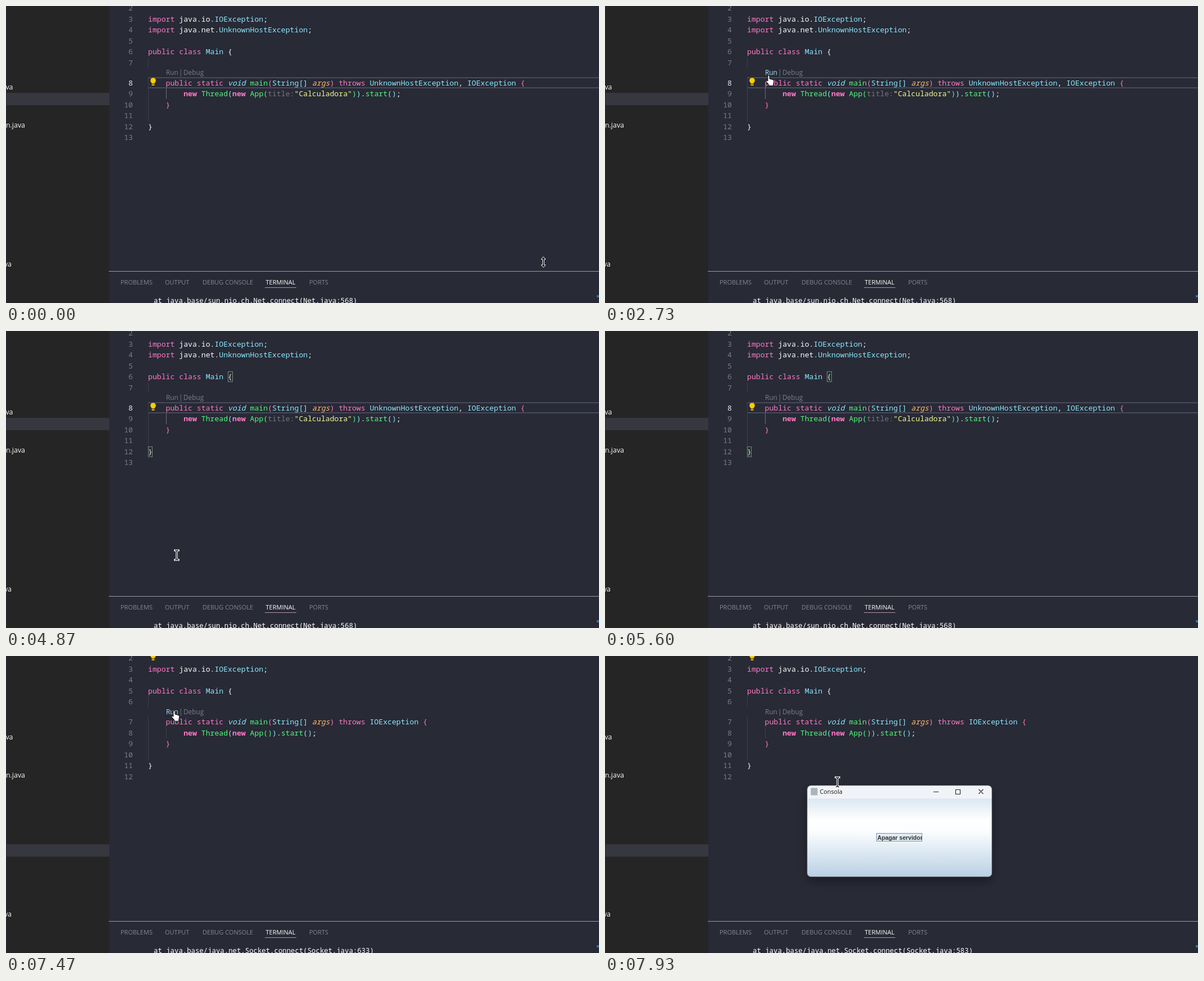
An HTML page that plays this animation: 1056x530 px, repeating every 8 s.

```html
<!DOCTYPE html>
<html lang="en">
<head>
<meta charset="utf-8">
<title>Code editor</title>
<style>
html, body { margin: 0; width: 100%; height: 100%; overflow: hidden; background: #282a36; }
svg { display: block; width: 1056px; height: 530px; }
text { white-space: pre; }
.code { font: 500 13.16px "Noto Sans Mono", "DejaVu Sans Mono", monospace; font-variant-ligatures: none; }
.term { font: 500 12.34px "Noto Sans Mono", "DejaVu Sans Mono", monospace; fill: #fff; }
.ui { font-family: "Open Sans", "Noto Sans", sans-serif; }
.num { fill: #7a7b87; text-anchor: end; font-weight: 400; }
.lens { font-size: 11.8px; fill: #7d7e8c; }
.lens.hover { fill: #a8e8f6; }
.w { fill: #fbfbf7; } .p { fill: #ff79c6; } .c { fill: #8be9fd; } .g { fill: #50fa7b; }
.y { fill: #f1fa8c; } .h { fill: #747581; font-weight: 400; }
.b { fill: #ff79c6; font-weight: bold; }
.i { fill: #8be9fd; font-style: italic; }
.a { fill: #ffb86c; font-style: italic; }
.guide { stroke: #3d3f4b; }
.box { fill: #0064001a; stroke: #7f8286; }
</style>
</head>
<body>
<svg viewBox="0 0 1056 530">
  <defs>
    <linearGradient id="metal" x2="0" y2="1">
      <stop offset="0" stop-color="#dbe7f1"/>
      <stop offset=".28" stop-color="#fff"/>
      <stop offset=".42" stop-color="#fbfdfe"/>
      <stop offset="1" stop-color="#b9d0e4"/>
    </linearGradient>
    <filter id="shadow" x="-20%" y="-20%" width="140%" height="150%">
      <feDropShadow dx="0" dy="7" stdDeviation="9" flood-color="#000" flood-opacity=".4"/>
    </filter>
    <clipPath id="label"><rect x="484" y="316" width="80.5" height="16"/></clipPath>
    <path id="beamLine" d="M-3-8.5Q0-8.5 0-6.5Q0-8.5 3-8.5M0-6.5V6.5M-3 8.5Q0 8.5 0 6.5Q0 8.5 3 8.5"/>
  </defs>

  <rect width="1056" height="530" fill="#282a36"/>
  <rect width="184" height="530" fill="#252525"/>
  <rect width="1" height="530" fill="#2b2c36"/>
  <rect id="selected" x="1" width="183" height="22" fill="#37373f"/>
  <g class="ui w" font-size="12.4" text-anchor="end">
    <text x="12.5" y="149">.java</text>
    <text x="34" y="217">n.java</text>
    <text x="10" y="465">.java</text>
  </g>

  <g id="first"></g>
  <g id="second"></g>

  <rect x="183" y="473" width="873" height="1" fill="#9b9ca3"/>
  <g id="tabs" class="ui" font-size="11" fill="#858692"></g>
  <rect x="461" y="502" width="56" height="1" fill="#b094a4"/>
  <text id="trace" class="term" x="263" y="530"></text>
  <rect x="1052" y="516" width="4" height="4" fill="#2f74a8"/>

  <g id="window">
    <rect x="360" y="231" width="329" height="163" rx="7" fill="#f2f3f8" filter="url(#shadow)"/>
    <path d="M360 254.5H689V387a7 7 0 0 1-7 7H367a7 7 0 0 1-7-7Z" fill="url(#metal)"/>
    <rect x="360" y="231" width="329" height="163" rx="7" fill="none" stroke="#62646d" stroke-width=".7"/>
    <rect x="366.5" y="235.5" width="12" height="13" fill="#a9b4bf"/>
    <text class="ui" x="382.5" y="246" font-size="10.8" fill="#191919">Consola</text>
    <path d="M585 242.5h9M624.5 238.5h8v8h-8zM665.5 238l8 8m0-8l-8 8" fill="none" stroke="#222" stroke-width="1.1"/>
    <rect x="483.5" y="316.5" width="81" height="14" fill="#e1ebf4" stroke="#7696b5"/>
    <text x="485" y="328" clip-path="url(#label)" fill="#333" font-family="Liberation Sans, Arial, sans-serif" font-weight="bold" font-size="10.5">Apagar servidor</text>
  </g>

  <g id="pointer">
    <path id="resize" d="M0-9.5 4-5H1.3V5H4L0 9.5-4 5H-1.3V-5H-4Z" fill="#111" stroke="#fff"/>
    <g id="beam" fill="none">
      <use href="#beamLine" stroke="#fff" stroke-width="3.4" stroke-linecap="square"/>
      <use href="#beamLine" stroke="#15161d" stroke-width="1.3"/>
    </g>
    <path id="hand" d="M-4-8.5q1.5-1.5 3 0v5.500l5 1.200q3 .8 2.800 3.500l-1 4v3.500h-8v-2l-4.500-5q-1-2 1-2.200l1.700 1.200Z" fill="#fff" stroke="#111"/>
  </g>
</svg>
<script>
const $ = id => document.getElementById(id);
const LEFT = 253, ROW = 19.5, LOOP = 8000, STEP = 1000 / 15;

// A caret followed by a letter switches the colour class.
const paint = source => source.split('^').slice(1)
  .map(part => `<tspan class="${part[0]}">${part.slice(1)}</tspan>`).join('');

const textLine = (row, y, source, current) =>
  `<text class="code num" x="226" y="${y}"${current ? ' style="fill:#f0f0ec"' : ''}>${row}</text>` +
  (source ? `<text class="code" x="${LEFT}" y="${y}">${paint(source)}</text>` : '');

const lens = y => `<g class="ui">
  <text class="lens run" x="285" y="${y}">Run</text>
  <text class="lens" x="308" y="${y}">|</text>
  <text class="lens" x="316" y="${y}">Debug</text></g>`;

const guides = list => list.map(([x, top, bottom, color]) =>
  `<path class="guide" d="M${x} ${top}V${bottom}"${color ? ` style="stroke:${color}"` : ''}/>`).join('');

const bulb = y => `<g transform="translate(262 ${y})" fill="#ffcc00">
  <circle cy="-2" r="4.8"/><path d="M-2.500 1h5v2.500h-5zM-2.500 4.700h5v2h-5z"/></g>`;

// The code lens takes extra room above the row named by "main".
const listing = (lines, main, mainCenter, current) => lines.map((source, index) => {
  const row = index + 2;
  const center = row < main ? 23 + (row - 3) * ROW : mainCenter + (row - main) * ROW;
  return textLine(row, center + 4.5, source, row === current);
}).join('');

const importIO = '^pimport ^wjava.io.^cIOException^w;';
const classLine = '^ppublic class ^cMain ^w{';
const signature = '^w    ^ppublic static ^ivoid ^gmain^p(^cString[] ^aargs^p) throws ^c';
const thread = '^w        ^bnew ^gThread^c(^bnew ^gApp(';

$('first').innerHTML =
  '<path d="M253 128H1056M253 146H1056" stroke="#474a5c" stroke-width="2"/>' +
  guides([[253.5, 92, 110], [253.5, 128, 206], [285.5, 147, 166, '#6c6d78']]) +
  listing(['', importIO, '^pimport ^wjava.net.^cUnknownHostException^w;', '', classLine, '',
    signature + 'UnknownHostException^w, ^cIOException ^p{',
    thread + '^htitle:^y"Calculadora"^g)^c)^w.^gstart^c()^w;',
    '^w    ^p}', '', '^w}', ''], 8, 137, 8) +
  lens(123) + bulb(135) +
  '<g id="brackets"><rect class="box" x="395.5" y="72.5" width="8" height="18"/>' +
  '<rect class="box" x="253.5" y="206.5" width="7" height="18"/></g>' +
  '<rect id="caret" x="300" y="127" width="2" height="20" fill="#f8f8f2"/>';

$('second').innerHTML =
  guides([[253.5, 72, 91], [253.5, 108, 186], [285.5, 127, 147]]) +
  listing(['', importIO, '', classLine, '', signature + 'IOException ^p{',
    thread + ')^c)^w.^gstart^c()^w;', '^w    ^p}', '', '^w}', ''], 7, 117.5) +
  lens(104) + bulb(1);

$('tabs').innerHTML = [[204, 'PROBLEMS'], [283, 'OUTPUT'], [350, 'DEBUG CONSOLE'],
  [462.5, 'TERMINAL'], [540, 'PORTS']].map(([x, name]) =>
  `<text x="${x}" y="496.5"${name === 'TERMINAL' ? ' class="w"' : ''}>${name}</text>`).join('');

const net = 'sun.nio.ch.Net.connect(Net.java:568)';
const nio = 'sun.nio.ch.NioSocketImpl.connect(NioSocketImpl.java:592)';
const socks = 'java.net.SocksSocketImpl.connect(SocksSocketImpl.java:327)';
const socket = line => `java.net.Socket.connect(Socket.java:${line})`;
const traceSteps = [[0, net], [3330, nio], [3400, socks], [3465, socket(633)], [4600, net],
  [7400, nio], [7465, socket(633)], [7730, socket(583)]];

// Time, x, y, shape at and after that time.
const path = [
  [0, 957, 457, 'resize'], [40, 957, 457, 'resize'], [66, 925, 447, 'beam'],
  [330, 560, 334, 'beam'], [600, 257, 240, 'beam'],
  [800, 257, 240, 'beam'], [1200, 430, 205, 'beam'], [1667, 669, 128, 'beam'],
  [2050, 520, 176, 'beam'], [2200, 430, 182, 'beam'], [2533, 330, 137, 'beam'],
  [2600, 312, 135, 'hand'], [2733, 294, 133, 'hand'], [2800, 294, 133, 'hand'], [2933, 301, 133, 'hand'],
  [4467, 301, 133, 'hand'], [4533, 276, 170, 'beam'], [4667, 253, 315, 'beam'], [4867, 304, 400, 'beam'],
  [5067, 335, 290, 'beam'], [5267, 346, 60, 'beam'], [5333, 346, 0, ''],
  [6066, 347, 84, 'beam'], [6267, 327, 57, 'beam'], [6333, 327, 0, ''],
  [6600, 265, 18, 'beam'], [6800, 286, 75, 'beam'], [6866, 297, 97, 'hand'], [7000, 302, 107, 'hand'],
  [7667, 302, 107, 'hand'], [7733, 325, 130, 'beam'], [7933, 414, 225, 'beam'], [LOOP, 414, 225, 'beam']
];

const lastBefore = (table, time) => {
  let index = table.length - 1;
  while (index && table[index][0] > time) index--;
  return index;
};
const show = (id, on) => { $(id).style.display = on ? '' : 'none'; };

function render(clock) {
  const time = Math.floor((clock % LOOP + 5) / STEP) * STEP % LOOP + 1;

  const index = lastBefore(path, time);
  const [start, x, y, shape] = path[index];
  const [end, nextX, nextY] = path[Math.min(index + 1, path.length - 1)];
  const part = end > start ? (time - start) / (end - start) : 0;
  $('pointer').setAttribute('transform',
    `translate(${Math.round(x + (nextX - x) * part)} ${Math.round(y + (nextY - y) * part)})`);
  for (const name of ['resize', 'beam', 'hand']) show(name, name === shape);
  document.querySelectorAll('.run').forEach(run => run.classList.toggle('hover', shape === 'hand'));

  const switched = time >= 5865;
  show('first', !switched);
  show('second', switched);
  $('selected').setAttribute('y', switched ? 336 : 155);
  show('brackets', time >= 3065);
  show('caret', time >= 3065 && time < 5600 && Math.floor((time - 3065) / 533.3) % 2 === 0);

  $('trace').textContent = 'at java.base/' + traceSteps[lastBefore(traceSteps, time)][1];

  const opening = Math.max(0, Math.min(1, (time - 7735) / 198));
  show('window', opening > 0);
  $('window').style.opacity = opening;
  const scale = .9 + .1 * opening;
  $('window').setAttribute('transform',
    `translate(524.5 312.5) scale(${scale}) translate(-524.5 -312.5)`);
}

const origin = performance.now();
function tick() {
  render(performance.now() - origin);
  requestAnimationFrame(tick);
}
tick();
</script>
</body>
</html>
```
